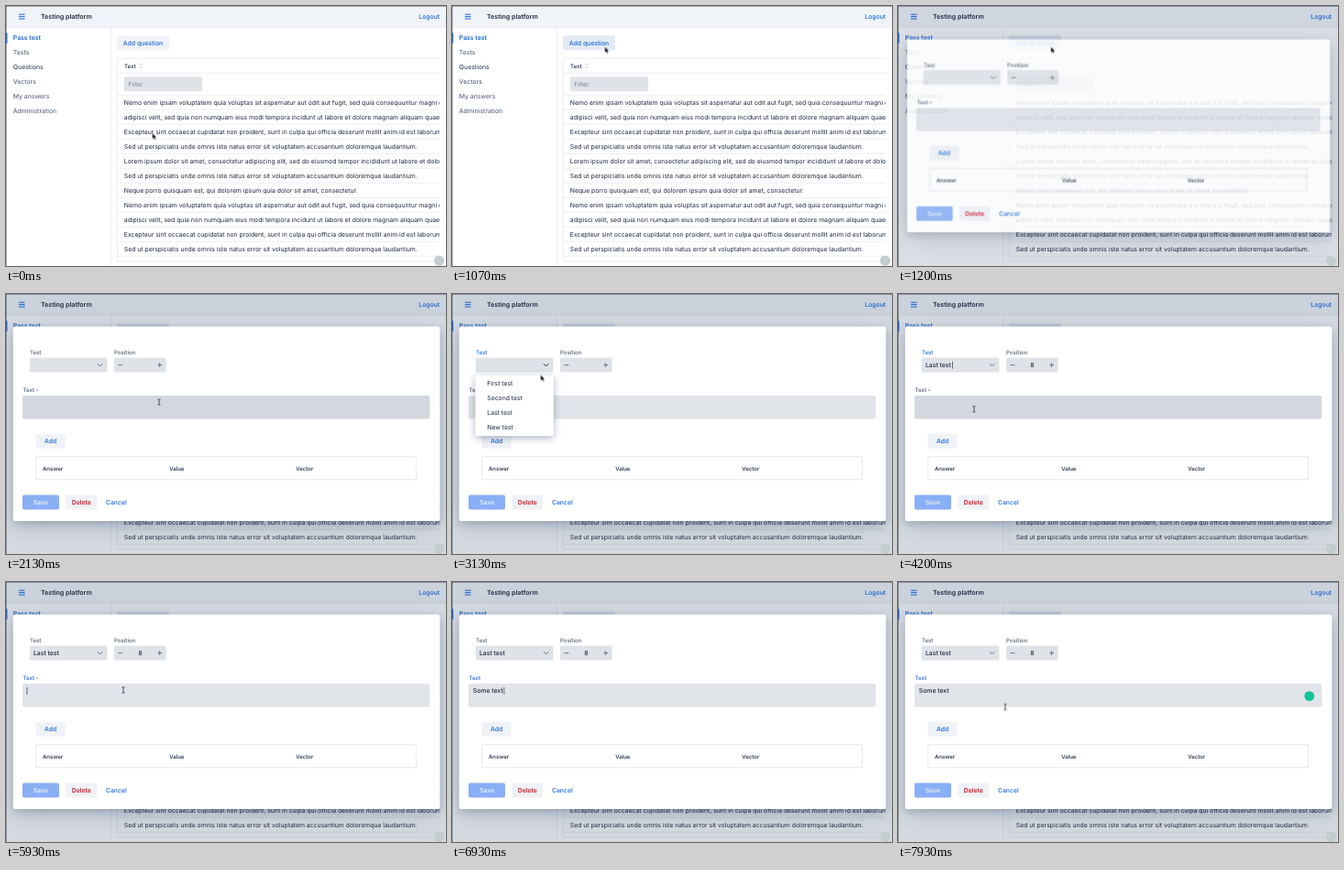
An HTML page for the animation above (8000 ms loop, 480 by 284 pixels).

```html
<!DOCTYPE html>
<html lang="en">
<head>
<meta charset="utf-8">
<title>Testing platform</title>
<style>
html, body { margin: 0; width: 100%; height: 100%; overflow: hidden; background: #fff; }
svg { display: block; width: 480px; height: 284px; }
text {
  font: 400 6.84px Inter, "Liberation Sans", sans-serif;
  text-rendering: geometricPrecision;
  fill: #1a273c;
  white-space: pre;
}
.medium { font-weight: 500; }
.bold { font-weight: 600; }
.title { font-weight: 600; font-size: 7.08px; }
.nav { font-weight: 500; fill: #5d6b7f; }
.small { font-size: 6.1px; font-weight: 500; }
.label { fill: #4e5c72; }
.mid { text-anchor: middle; }
.blue { fill: #1566dd; }
.red { fill: #d2182f; }
.line { fill: none; stroke: #e5e8ec; stroke-width: .7; }
.icon { fill: none; stroke: #67758a; stroke-width: 1; stroke-linecap: round; }
.field { fill: #dfe3e8; }
.button { fill: #eff2f6; }

.step { animation: 8s step-end infinite; }
.move { animation: 8s linear infinite; }

#backdrop { fill: #1c375a; fill-opacity: .18; animation-name: fade; }
#dialog { transform-origin: 240.5px 142px; animation-name: open; }
#panel { fill: #fff; filter: drop-shadow(0 3px 5px rgba(28, 52, 84, .24)) drop-shadow(0 7px 14px rgba(28, 52, 84, .16)); }
#hover { fill: #e3eaf4; animation-name: hover; }
#testLabel { animation-name: testLabel; }
#textLabel { animation-name: textLabel; }
#chevron { animation-name: chevron; }
#area { animation-name: area; }
#chosen { animation-name: chosen; }
#testCaret { animation-name: testCaret; }
#dot { animation-name: dot; }
#typed { animation-name: typed; }
#cover { fill: #e1e4e9; animation-name: type; }
#caret { animation-name: type, blink; }
#checker { fill: #15c39a; animation-name: checker; }
#menu { animation-name: menu; }
#menu > .box { fill: #fff; filter: drop-shadow(0 2px 4px rgba(28, 52, 84, .38)); }
#mark { fill: #edf1f6; animation-name: mark; }
#pointer { animation: pointer 8s ease-in-out infinite, hide 8s step-end infinite; }
#arrow { animation-name: arrow; }
#beam { animation-name: beam; }

@keyframes fade { 0%, 14.79% { opacity: 0 } 14.8%, 15.1% { opacity: .88 } 15.8%, 100% { opacity: 1 } }
@keyframes open {
  0%, 14.79% { opacity: 0; transform: scale(.991) }
  14.8%, 15.1% { opacity: .86; transform: scale(.991) }
  15.8%, 100% { opacity: 1; transform: none }
}
@keyframes hover { 0% { opacity: 0 } 11.6%, 100% { opacity: 1 } }
@keyframes testLabel { 0% { fill: #4e5c72 } 34.2% { fill: #1566dd } 56.5%, 100% { fill: #4e5c72 } }
@keyframes textLabel { 0% { fill: #4e5c72 } 56.5%, 100% { fill: #1566dd } }
@keyframes chevron { 0% { stroke: #67758a } 34.2% { stroke: #1d2b41 } 48.2%, 100% { stroke: #67758a } }
@keyframes area {
  0% { fill: #e1e4e9 }
  22.4% { fill: #d3d8de }
  28.4% { fill: #e1e4e9 }
  48.2% { fill: #d3d8de }
  56.5%, 100% { fill: #e1e4e9 }
}
@keyframes chosen { 0% { opacity: 0 } 48.2%, 100% { opacity: 1 } }
@keyframes testCaret { 0% { opacity: 0 } 48.2% { opacity: 1 } 56.5%, 100% { opacity: 0 } }
@keyframes dot { 0% { opacity: 1 } 74.9%, 100% { opacity: 0 } }
@keyframes typed { 0% { opacity: 0 } 74%, 100% { opacity: 1 } }
@keyframes type {
  0% { transform: none }
  74.9% { transform: translateX(4.4px) }
  75.7% { transform: translateX(8.5px) }
  76.5% { transform: translateX(14.5px) }
  77.4% { transform: translateX(18.6px) }
  79.9% { transform: translateX(22.9px) }
  81.5% { transform: translateX(27px) }
  84.9% { transform: translateX(30.8px) }
  86.5%, 100% { transform: translateX(33.7px) }
}
@keyframes blink { 0% { opacity: 0 } 56.5% { opacity: 1 } 62.4% { opacity: 0 } 74% { opacity: 1 } 92.8%, 100% { opacity: 0 } }
@keyframes checker { 0% { opacity: 0 } 95%, 100% { opacity: 1 } }
@keyframes menu { 0% { opacity: 0 } 34.9% { opacity: 1 } 48.2%, 100% { opacity: 0 } }
@keyframes mark {
  0% { opacity: 0; transform: none }
  40.8% { opacity: 1; transform: none }
  42.3% { opacity: 1; transform: translateY(16px) }
  44.1%, 100% { opacity: 1; transform: translateY(32px) }
}
@keyframes pointer {
  0%, 3.6% { transform: translate(159.6px, 138.8px) }
  13.3%, 15.5% { transform: translate(166.7px, 44.5px) }
  24.2%, 27% { transform: translate(167px, 118px) }
  34.1%, 36.2% { transform: translate(102px, 79px) }
  38.8%, 40% { transform: translate(96.6px, 88.2px) }
  46.6%, 48.2% { transform: translate(62px, 127px) }
  52.3%, 53% { transform: translate(83px, 125.8px) }
  56.6%, 58% { transform: translate(92px, 122px) }
  62.5%, 90.8% { transform: translate(128px, 118px) }
  98.3%, 100% { transform: translate(117px, 136.5px) }
}
@keyframes hide { 0% { opacity: 1 } 74.9% { opacity: 0 } 90.8%, 100% { opacity: 1 } }
@keyframes arrow { 0% { opacity: 1 } 22.4% { opacity: 0 } 28.4% { opacity: 1 } 48.2%, 100% { opacity: 0 } }
@keyframes beam { 0% { opacity: 0 } 22.4% { opacity: 1 } 28.4% { opacity: 0 } 48.2%, 100% { opacity: 1 } }
</style>
</head>
<body>
<svg viewBox="0 0 480 284">
  <defs><clipPath id="view"><rect x="120" y="56" width="353.2" height="224"/></clipPath></defs>

  <rect width="480" height="284" fill="#fff"/>
  <rect width="480" height="23.5" fill="#f0f4f9"/>
  <path class="line" d="M0 23.6H480M114.4 24V284"/>
  <path d="M0 .3H480M.3 0V284" stroke="#50555c" stroke-width=".6" fill="none"/>
  <path d="M14 9.2h6.6M14 11.6h6.6M14 14h6.6" stroke="#1566dd" stroke-width="1"/>
  <text class="title" x="38" y="14.2">Testing platform</text>
  <text class="medium blue" x="450.3" y="14.2">Logout</text>

  <rect x="0" y="29.3" width="1.4" height="11.4" class="blue"/>
  <text class="bold blue" x="7.8" y="37.2">Pass test</text>
  <text class="nav" x="7.8" y="53.3">Tests</text>
  <text class="nav bold" x="7.8" y="69.3" style="fill:#3f4d63">Questions</text>
  <text class="nav" x="7.8" y="85.3">Vectors</text>
  <text class="nav" x="7.8" y="101.3">My answers</text>
  <text class="nav" x="7.8" y="117.3">Administration</text>

  <rect class="button" x="121" y="32.3" width="57" height="16" rx="1.8"/>
  <rect id="hover" class="step" x="121" y="32.3" width="57" height="16" rx="1.8"/>
  <text class="medium blue mid" x="149.5" y="42.6">Add question</text>

  <g id="grid" clip-path="url(#view)">
    <path class="line" d="M480 57.3H121.4V279H480M121.4 73.3H480"/>
    <text class="small" x="129" y="67.5">Text</text>
    <path class="icon" d="M145.6 64.3l1.5-1.5 1.5 1.5M145.6 66.3l1.5 1.5 1.5-1.5" style="stroke:#b3bbc6;stroke-width:.7"/>
    <rect class="field" x="129" y="77.3" width="85.3" height="16" rx="1.8"/>
    <text x="133.5" y="87.8" style="fill:#7b889a">Filter</text>
  </g>

  <rect id="backdrop" class="move" width="480" height="284"/>

  <g id="dialog" class="move">
    <rect id="panel" x="7.8" y="35.6" width="465.6" height="212.4" rx="2"/>

    <text id="testLabel" class="small label step" x="26" y="65.6">Test</text>
    <rect class="field" x="25.7" y="69.6" width="84.8" height="16" rx="1.8"/>
    <path id="chevron" class="icon step" d="M100.2 76.4l2.4 2.5 2.4-2.5"/>
    <line id="testCaret" class="step" x1="59.6" x2="59.6" y1="73.5" y2="81.6" stroke="#1d2b41" stroke-width=".7"/>

    <text class="small label" x="118" y="65.6">Position</text>
    <rect class="field" x="118" y="69.6" width="56.7" height="16" rx="1.8"/>
    <path class="icon" d="M123 77.6h4M165.7 77.6h4M167.7 75.6v4"/>
    <g id="chosen" class="step">
      <text class="medium" x="30" y="80">Last test</text>
      <text class="medium mid" x="146.3" y="80">8</text>
    </g>

    <text id="textLabel" class="small label step" x="18.6" y="107">Text</text>
    <g id="dot" class="step"><circle cx="34" cy="105" r=".75" class="label"/></g>
    <rect id="area" class="step" x="18" y="111" width="444.3" height="25.6" rx="1.8"/>
    <g id="typed" class="step">
      <text class="medium" x="22.8" y="121.4">Some text</text>
      <rect id="cover" class="step" x="22.6" y="112.5" width="40" height="13"/>
    </g>
    <line id="caret" class="step" x1="23" x2="23" y1="115" y2="123" stroke="#1d2b41" stroke-width=".7"/>
    <circle id="checker" class="step" cx="448.8" cy="124.6" r="5.4"/>

    <rect class="button" x="32.5" y="152.8" width="32" height="16" rx="1.8"/>
    <text class="medium blue mid" x="48.5" y="163.2">Add</text>

    <rect class="line" x="32.8" y="177.8" width="415" height="25" style="stroke:#dde1e6"/>
    <text class="small" x="40" y="192.7">Answer</text>
    <text class="small" x="178.2" y="192.7">Value</text>
    <text class="small" x="316.2" y="192.7">Vector</text>

    <rect x="18" y="219.5" width="40" height="16" rx="1.8" fill="#89aff5"/>
    <text class="bold mid" x="38" y="230" style="fill:#e6effd">Save</text>
    <rect class="button" x="65.4" y="219.5" width="33.8" height="16" rx="1.8"/>
    <text class="bold red mid" x="82.3" y="230">Delete</text>
    <text class="medium blue mid" x="120.3" y="230">Cancel</text>
  </g>

  <g id="menu" class="step">
    <rect class="box" x="25.5" y="89" width="85.3" height="66" rx="1.8"/>
    <rect id="mark" class="step" x="27.3" y="89.6" width="81.6" height="15.8" rx="1.4"/>
    <text x="38.3" y="99.7">First test</text>
    <text x="38.3" y="115.7">Second test</text>
    <text x="38.3" y="131.7">Last test</text>
    <text x="38.3" y="147.7">New test</text>
  </g>

  <circle cx="472.6" cy="278.2" r="5.6" fill="#c3cccf"/>

  <g id="pointer">
    <path id="arrow" class="step" d="M0 0V6.6L1.6 5.2L2.6 7.5L3.8 7L2.8 4.8H4.7Z" fill="#111" stroke="#fff" stroke-width=".4"/>
    <path id="beam" class="step" d="M-1.5-3.3Q0-3.3 0-2.4Q0-3.3 1.5-3.3M0-2.6V2.6M-1.5 3.3Q0 3.3 0 2.4Q0 3.3 1.5 3.3" fill="none" stroke="#2a2f37" stroke-width=".8"/>
  </g>
</svg>
<script>
const nemo = "Nemo enim ipsam voluptatem quia voluptas sit aspernatur aut odit aut fugit, sed quia consequuntur magni dolores";
const velit = "adipisci velit, sed quia non numquam eius modi tempora incidunt ut labore et dolore magnam aliquam quaerat";
const sint = "Excepteur sint occaecat cupidatat non proident, sunt in culpa qui officia deserunt mollit anim id est laborum.";
const sed = "Sed ut perspiciatis unde omnis iste natus error sit voluptatem accusantium doloremque laudantium.";
const lorem = "Lorem ipsum dolor sit amet, consectetur adipiscing elit, sed do eiusmod tempor incididunt ut labore et dolore magna";
const neque = "Neque porro quisquam est, qui dolorem ipsum quia dolor sit amet, consectetur.";

const grid = document.getElementById("grid");
const add = (tag, attrs) => {
  const node = document.createElementNS("http://www.w3.org/2000/svg", tag);
  for (const key in attrs) node.setAttribute(key, attrs[key]);
  return grid.appendChild(node);
};

[nemo, velit, sint, sed, lorem, sed, neque, nemo, velit, sint, sed].forEach((row, i) => {
  const y = 97.3 + 16 * i;
  add("path", { class: "line", d: `M121.4 ${y}H480` });
  add("text", { x: 128.8, y: y + 10.3 }).textContent = row;
});
add("path", { class: "line", d: "M121.4 273.3H480" });
</script>
</body>
</html>
```
